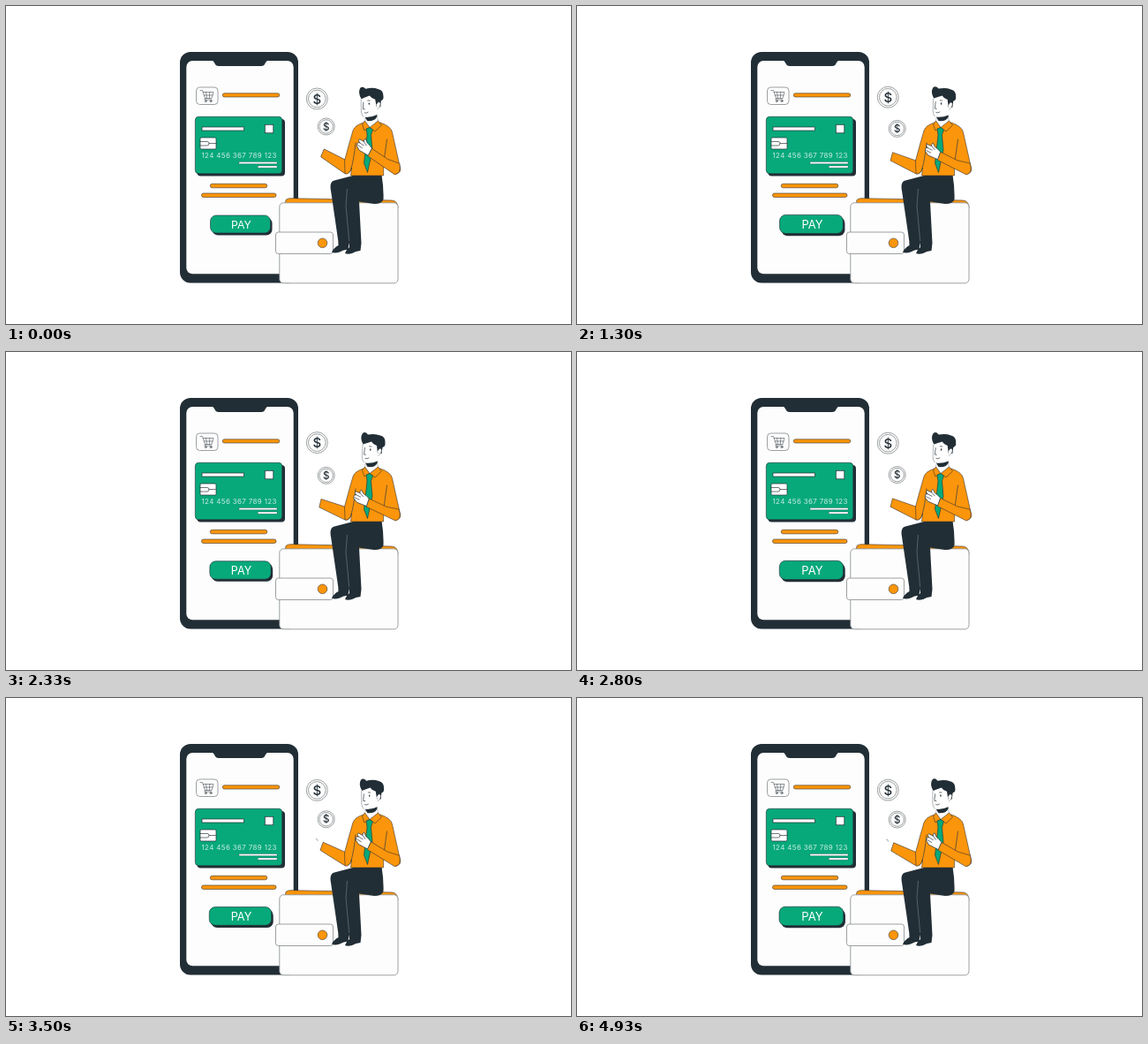
These frames come from a looping animation (640 by 360 pixels, 5 s). An HTML page:

```html
<!DOCTYPE html>
<html lang="en">
<head>
<meta charset="utf-8">
<title>Mobile payment</title>
<style>
  html, body { margin: 0; width: 100%; height: 100%; overflow: hidden; background: #fff; }
  svg { display: block; width: 100vw; height: 100vh; }
  text { font-family: Inter, "Open Sans", sans-serif; fill: #fff; }
  .dark { fill: #222e36; }
  .green { fill: #07a97a; stroke: #222e36; stroke-width: .6; }
  .orange { fill: #fb950b; stroke: #3a3430; stroke-width: .6; stroke-linejoin: round; }
  .white { fill: #fff; stroke: #222e36; stroke-width: .7; }
  .paper { fill: #fdfdfd; stroke: #85898b; stroke-width: .8; }
  .line { fill: none; stroke: #343d43; stroke-width: .7; stroke-linecap: round; stroke-linejoin: round; }
</style>
</head>
<body>
<svg viewBox="0 0 640 360">
  <g id="phone">
    <rect class="dark" x="197" y="52" width="134" height="261.5" rx="12"/>
    <rect x="204.3" y="62" width="121.4" height="241.3" rx="7" fill="#fdfdfd"/>
    <path class="dark" d="M232 61H298Q294.5 62 293.5 65Q292.5 68 289 68H241Q237.500 68 236.500 65Q235.500 62 232 61Z"/>
    <rect class="paper" x="215.500" y="92" width="24.500" height="19.500" rx="4"/>
    <path class="line" stroke-opacity=".75" d="M220 95.500H222.500L225.500 104.500H233L235 97.500H223.300M224.300 101H234M226.500 97.500L227.500 104.500M230.800 97.500L230.300 104.500M225.500 104.500L224.800 106H233"/>
    <circle class="line" cx="226.300" cy="107.600" r="1"/>
    <circle class="line" cx="232" cy="107.600" r="1"/>
    <rect class="orange" x="245.300" y="98.800" width="64.500" height="4.200" rx="2.100"/>
  </g>

  <g id="card">
    <rect class="dark" x="216.500" y="128" width="99.500" height="64.500" rx="4"/>
    <rect class="green" x="214.300" y="125.300" width="98.500" height="64.500" rx="4"/>
    <rect class="white" x="222" y="137" width="47.500" height="4"/>
    <rect class="white" x="293.300" y="134.300" width="9.500" height="9.500"/>
    <rect class="white" x="220" y="149" width="18" height="13" rx="1.500"/>
    <path class="line" d="M220 153.500H228Q230 153.500 230 155.500Q230 158 228 158H220M230 155.500H238"/>
    <text x="221.500" y="172" font-size="8" textLength="85" fill-opacity=".78">124 456 367 789 123</text>
    <rect class="white" stroke-opacity=".4" x="264" y="176.500" width="43" height="2.200"/>
    <rect class="white" stroke-opacity=".4" x="285.300" y="181" width="21.700" height="2.200"/>
  </g>
  <rect class="orange" x="231.300" y="201.300" width="64.500" height="4.500" rx="2.200"/>
  <rect class="orange" x="221.500" y="212" width="84.500" height="4.500" rx="2.200"/>

  <g id="pay">
    <rect class="dark" x="233.500" y="239.500" width="68" height="20" rx="6.500"/>
    <rect class="green" x="231.500" y="237" width="68" height="20" rx="6.500"/>
    <text x="266.500" y="251.700" font-size="12.300" text-anchor="middle">PAY</text>
  </g>

  <g id="wallet">
    <path class="orange" d="M316 226L317 219.500Q319 217.500 323 217.700L437 220Q444 220.500 444 229Z"/>
    <rect class="paper" x="309.800" y="222.800" width="134.200" height="91" rx="4.500"/>
    <rect class="paper" x="305.500" y="256" width="65" height="24.500" rx="3"/>
    <circle class="orange" cx="358.500" cy="268.300" r="5.300"/>
  </g>

  <g id="coinA">
    <circle class="paper" cx="352.300" cy="105" r="12"/>
    <circle class="paper" cx="352.300" cy="105" r="9.800"/>
    <text x="352.300" y="110.500" font-size="15" font-weight="500" text-anchor="middle" style="fill:#222e36">$</text>
  </g>
  <g id="coinB">
    <circle class="paper" cx="362.700" cy="136.500" r="9.500"/>
    <circle class="paper" cx="362.700" cy="136.500" r="7.700"/>
    <text x="362.700" y="140.700" font-size="11.500" font-weight="500" text-anchor="middle" style="fill:#222e36">$</text>
  </g>

  <g id="man">
    <path class="dark" d="M397 191H425.500Q428 206 427.500 219Q426 224 417 224L400 221.500L402.500 268.500L401.500 277Q396 277.500 392 280Q387 281.500 384 280Q385 276 389 273L388.500 268L387.500 275.500Q382 276 378 278.500Q372 280.500 369 278.500Q371 274 376.500 271L376.300 266L368 209Q366 199 372 197.500Z"/>
    <path d="M386.500 207L385 226L388.700 266" fill="none" stroke="#78838a" stroke-width=".6"/>
    <g id="foreL">
      <path class="line" id="finger" d="M349 162.500L350.500 163L351.300 164.500"/>
      <path class="orange" d="M357.500 165.700L384 175L392 180Q391 191 384 190L355 175Z"/>
    </g>
    <path class="orange" d="M405 132Q395 135 393 141Q388 158 383.500 175L384 190Q389 191 391.500 183L390.500 192H427.500L428 176L441 190.500Q449 189 446 181L437.500 143Q436 136 424 132Z"/>
    <path class="line" d="M396 155Q394 174 391 184M431.500 151L428 176"/>
    <path class="white" stroke-opacity=".4" d="M407.500 123L406.500 131L412 139L421.500 131L420 122Z"/>
    <path class="orange" d="M406.500 130L403.500 134L406 141L412 137.500ZM421.500 130L425.500 135L418 142L412 137.500Z"/>
    <path class="green" d="M408 139L412 137.500L415.500 140L413.500 146L415 163L409.500 188.500L405.500 178L409 146Z"/>
    <g id="foreR">
      <path class="orange" d="M411.500 165.500L431 175L445 178Q449 189 441 191L408 174.500Z"/>
      <path class="white" d="M411.500 165.500Q409 162 405.500 160L403 155.500Q401 156 401.500 159L396.500 157Q394.500 158 397 161Q393.500 161 394.500 163.500Q393.500 165.500 396 167Q396 169 399 170L408.500 174Z"/>
      <path class="line" d="M397 161L402 163.500M395.500 164L400.500 166.500M401.500 159L405 163"/>
    </g>
    <g id="head">
      <path fill="#fff" d="M404 100L403.500 119Q404 126 409 127.500L421 124L426 108V98Z"/>
      <path class="line" stroke-opacity=".55" d="M404 105L403.300 119Q403.500 123 405.500 125"/>
      <path class="dark" d="M407 125.500Q414 126.500 421 123.500L420.500 126Q418 131 409.500 130Z"/>
      <path class="dark" d="M404.500 104.500Q400.500 97 404 92Q407 89.500 410 93.500Q418 92 424 94.500Q430 96 429.500 103Q430 107 426.500 108L425.500 115H421L420 106Q416 105 414 101.500Q409 103 404.500 104.500Z"/>
      <path class="white" stroke-opacity=".5" d="M421 112Q424 107 425.500 111Q425 116 421.500 117.500"/>
      <path class="line" d="M406.500 108.500L405.500 116L407.500 116.300M411.500 106.800L414 107M407 120.500Q409 121.500 411 120"/>
      <ellipse class="dark" cx="412.800" cy="110.500" rx=".7" ry="1.200"/>
    </g>
  </g>
</svg>
<script>
const LOOP = 5000, BEAT = 2000, SWAY = 4150;
const $ = id => document.getElementById(id);
const [pay, coinA, coinB, head, foreL, foreR, finger] =
  ["pay", "coinA", "coinB", "head", "foreL", "foreR", "finger"].map($);

// 1 at the start of each period, 0 halfway through
const wave = (t, period) => (1 + Math.cos(2 * Math.PI * t / period)) / 2;
const set = (el, value) => el.setAttribute("transform", value);
const turn = (el, deg, x, y) => set(el, `rotate(${deg} ${x} ${y})`);

// Two steps per 100 ms: one of 30 ms, one of 70 ms
function step(t) {
  const base = Math.floor(t / 100) * 100;
  return t - base < 30 ? base : base + 50;
}

function draw(t) {
  const sway = wave(t, SWAY), lift = sway ** 1.5;
  const size = 1 + .07 * (1 - wave(t, BEAT));
  set(pay, `translate(266.5 248) scale(${size}) translate(-266.5 -248)`);
  set(coinA, `translate(0 ${-2.5 * (1 - sway)})`);
  set(coinB, `translate(0 ${3.5 * (1 - sway)})`);
  turn(head, -4 * lift, 414, 132);
  turn(foreL, 9 * lift - 1.5, 388, 185);
  turn(foreR, 9 * lift - 1, 443, 184);
  finger.style.opacity = lift > .3 && lift < 1 ? .6 : 0;
}

const start = performance.now();
function tick() {
  draw(step((performance.now() - start) % LOOP));
  requestAnimationFrame(tick);
}
tick();
</script>
</body>
</html>
```
